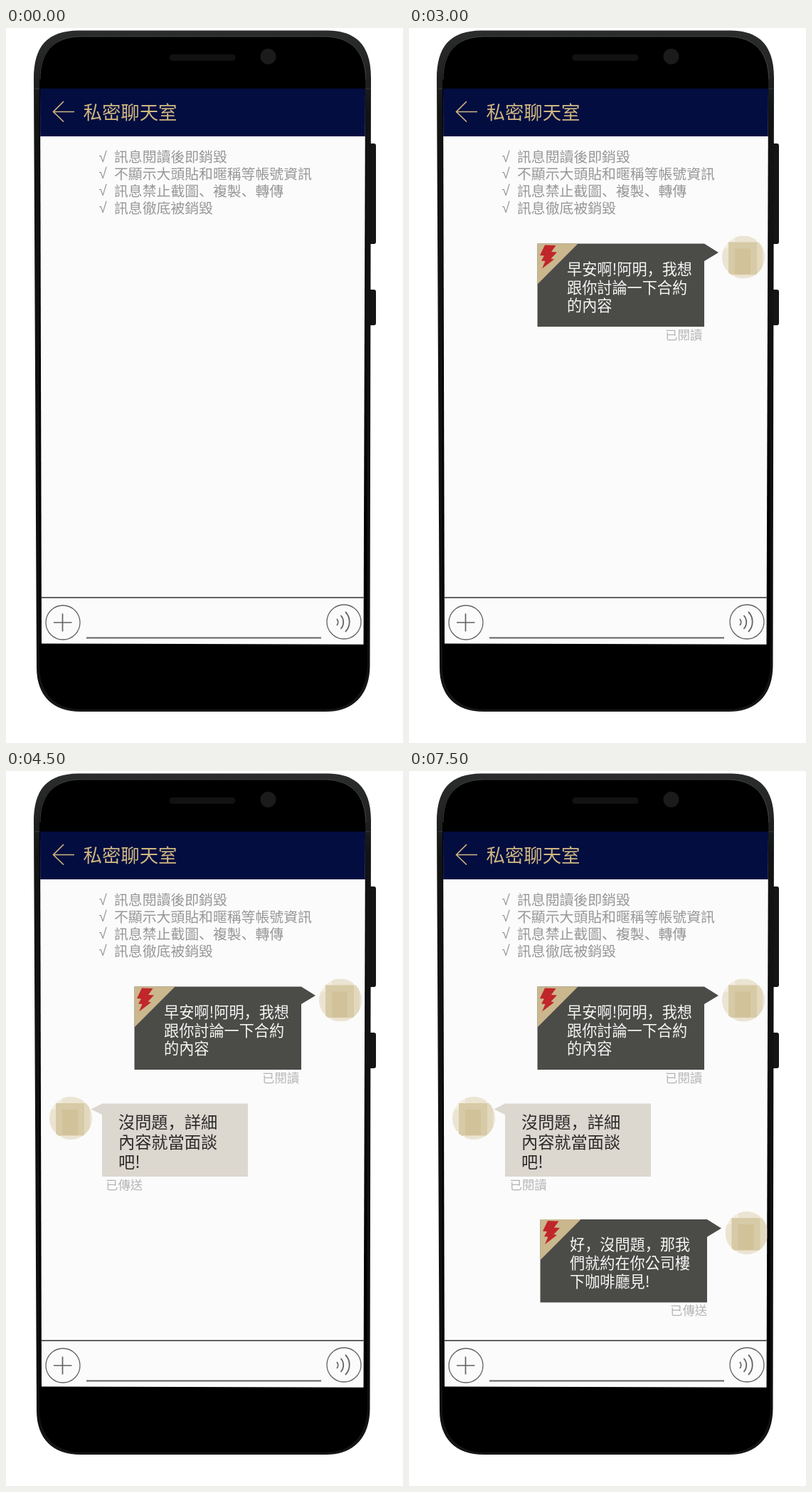
Animation of 558x1003 px, one loop 8 s. Source, as an HTML page:

```html
<!DOCTYPE html>
<html lang="zh-Hant">
<head>
<meta charset="utf-8">
<title>私密聊天室</title>
<style>
html, body { margin: 0; width: 100%; height: 100%; overflow: hidden; background: #fff; }
svg { display: block; width: 558px; height: 1003px; }
text { font-family: "Noto Sans CJK TC", "Noto Sans CJK", sans-serif; white-space: pre; }
/* Low, left-set commas instead of the centred ones. */
.punct { font-family: "Noto Sans CJK JP", "Noto Sans CJK", sans-serif; font-feature-settings: "locl" 0; }
.check { font: 20.5px "Liberation Sans", sans-serif; }
.title { font-size: 26.4px; fill: #cfb781; }
.notes { font-size: 19.85px; fill: #979799; }
.said { font-size: 21.15px; fill: #f6f6f6; }
.reply { font-size: 23.2px; fill: #2b2a29; }
.status { font-size: 17.4px; fill: #b5b5b6; }
.line { fill: none; stroke: #626264; }

/* Each part switches on, or on and off, without a fade. */
.step { opacity: 0; animation: 8s step-end infinite; }
.hello { animation-name: hello; }
.hello-sent { animation-name: hello-sent; }
.hello-read { animation-name: hello-read; }
.answer { animation-name: answer; }
.answer-sent { animation-name: answer-sent; }
.answer-read { animation-name: answer-read; }
.meet { animation-name: meet; }
@keyframes hello { 0% { opacity: 0 } 18.75%, 100% { opacity: 1 } }
@keyframes hello-sent { 0%, 37.5%, 100% { opacity: 0 } 18.75% { opacity: 1 } }
@keyframes hello-read { 0% { opacity: 0 } 37.5%, 100% { opacity: 1 } }
@keyframes answer { 0% { opacity: 0 } 56.25%, 100% { opacity: 1 } }
@keyframes answer-sent { 0%, 75%, 100% { opacity: 0 } 56.25% { opacity: 1 } }
@keyframes answer-read { 0% { opacity: 0 } 75%, 100% { opacity: 1 } }
@keyframes meet { 0% { opacity: 0 } 93.75%, 100% { opacity: 1 } }
</style>
</head>
<body>
<svg viewBox="0 0 558 1003">
  <defs>
    <linearGradient id="rim" x2="0" y2="1">
      <stop offset="0" stop-color="#2b2c2c"/>
      <stop offset=".06" stop-color="#222323"/>
      <stop offset=".12" stop-color="#121313"/>
      <stop offset=".9" stop-color="#0e0e0e"/>
      <stop offset="1" stop-color="#161616"/>
    </linearGradient>
    <clipPath id="screen"><path d="M48 85H505L502.500 864.800 50 863.500Z"/></clipPath>
    <clipPath id="disc"><circle r="30"/></clipPath>
    <g id="avatar" clip-path="url(#disc)">
      <circle r="30" fill="#f2ede1"/>
      <path d="M-30-12H30V18H-30ZM-12-30H18V30H-12Z" fill="#ebe4d2"/>
      <path d="M-21-21H27V25H-21Z" fill="#e2d8bd"/>
      <path d="M-21-21H19V24H-21Z" fill="#d7caa6"/>
      <path d="M-12-12H10V24H-12Z" fill="#d1c299"/>
    </g>
    <g id="bubble">
      <path d="M180.500 302.500H415L435 315 415 327V419H180.500Z" fill="#4b4b48"/>
      <path d="M180.500 302.500H237.500L180.500 359.500Z" fill="#cbb78d"/>
      <path d="M191 304.500 206.500 305 200 314 208 314.500 199.500 323.500 204 324.500 187 337.500 191.500 327 186 326.500 190 319.500 184 319Z" fill="#c0262a"/>
    </g>
  </defs>

  <path d="M510 162H517Q520 162 520 165V300Q520 303 517 303H510ZM510 367H517Q520 367 520 370V414Q520 417 517 417H510Z" fill="#151515"/>
  <path d="M39 72C39 25 58 4 102 3.500H452C494 4 513 26 513 70L511.500 895C511 935 489 959 450 959H105C66 959 43 937 43 897Z" fill="url(#rim)"/>
  <path d="M47 74C47 35 64 13 104 12H449C487 13 505 35 505 72L508 893C507 931 487 956 449 956H106C70 956 48 934 47 897Z"/>
  <path d="M48 72C48 35 65 13 104 12H449C487 13 505 35 506 72" fill="none" stroke="#404040"/>
  <path d="M40.500 85H47M505.500 85H512" stroke="#3c3c3c"/>
  <rect x="229.500" y="37" width="93" height="9" rx="4.500" fill="#121212"/>
  <circle cx="368.500" cy="40" r="11" fill="#1b1b1b"/>

  <g clip-path="url(#screen)">
    <path d="M40 80H520V870H40Z" fill="#fbfbfb"/>
    <path d="M40 80H520V152H40Z" fill="#030d40"/>
    <path d="M96 117.500H66.500M81 103 66.500 117.500 81 131.500" fill="none" stroke="#cfb781" stroke-width="1.6"/>
    <text class="title" x="108.500" y="128">私密聊天室</text>

    <g class="notes">
      <text class="check" x="130.500" y="187.500">√</text>
      <text class="check" x="130.500" y="211.300">√</text>
      <text class="check" x="130.500" y="235.200">√</text>
      <text class="check" x="130.500" y="259">√</text>
      <text x="152" y="188.200">訊息閱讀後即銷毀</text>
      <text x="152" y="212">不顯示大頭貼和暱稱等帳號資訊</text>
      <text x="152" y="235.900">訊息禁止截圖<tspan class="punct" lang="ja">、</tspan>複製<tspan class="punct" lang="ja">、</tspan>轉傳</text>
      <text x="152" y="259.700">訊息徹底被銷毀</text>
    </g>

    <g class="step hello">
      <use href="#bubble"/>
      <use href="#avatar" x="470" y="321.500"/>
      <g class="said">
        <text x="222" y="345.700">早安啊!阿明<tspan class="punct" lang="ja">，</tspan>我想</text>
        <text x="222" y="371.500">跟你討論一下合約</text>
        <text x="222" y="397.200">的內容</text>
      </g>
    </g>
    <text class="status step hello-sent" x="360" y="436.500">已傳送</text>
    <text class="status step hello-read" x="360" y="436.500">已閱讀</text>

    <g class="step answer">
      <path d="M135 466.500H340V569H135V482L119.500 474.500Z" fill="#dcd7cf"/>
      <use href="#avatar" x="91" y="487"/>
      <g class="reply">
        <text x="158" y="500.500">沒問題<tspan class="punct" lang="ja">，</tspan>詳細</text>
        <text x="158" y="528.500">內容就當面談</text>
        <text x="158" y="556.500">吧!</text>
      </g>
    </g>
    <text class="status step answer-sent" x="140" y="587">已傳送</text>
    <text class="status step answer-read" x="141.500" y="587">已閱讀</text>

    <g class="step meet">
      <use href="#bubble" x="4" y="326.500"/>
      <use href="#avatar" x="474.500" y="648"/>
      <g class="said">
        <text x="226" y="672.200">好<tspan class="punct" lang="ja">，</tspan>沒問題<tspan class="punct" lang="ja">，</tspan>那我</text>
        <text x="226" y="698">們就約在你公司樓</text>
        <text x="226" y="723.700">下咖啡廳見!</text>
      </g>
      <text class="status" x="367" y="763">已傳送</text>
    </g>

    <g class="line" stroke-width="2">
      <path d="M48 799H505M113 855.500H443"/>
      <g stroke-width="1.300">
        <circle cx="80" cy="834" r="24"/>
        <circle cx="475" cy="833" r="24"/>
      </g>
      <path d="M67 834H92.500M79.500 821.500V846.500" stroke-width="1.700"/>
      <path d="M465 829A7 7 0 0 1 465 838M470.500 824A14 14 0 0 1 470.500 843M477 819A20 20 0 0 1 477 847" stroke-width="1.800"/>
    </g>
  </g>
</svg>
</body>
</html>
```
